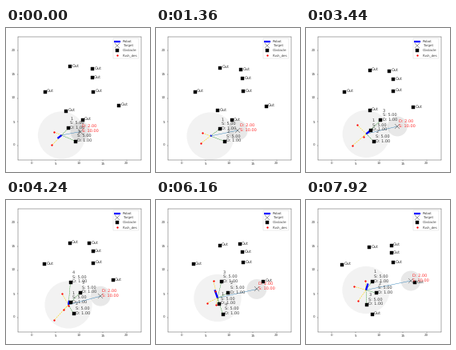
These frames come from a looping animation (180 by 180 pixels, 8 s). A matplotlib script:

```python
import matplotlib.pyplot as plt
import numpy as np
from matplotlib.animation import FuncAnimation
from matplotlib.patches import Circle

SIZE, DPI, FRAMES, STEP_MS = 180, 30, 100, 80
LEFT, RIGHT, TOP, BOTTOM = 14.5, 168.5, 10.5, 164.5
LOW, HIGH = -3, 23
UNIT = (RIGHT - LEFT) / (HIGH - LOW)
SENSE, GOAL_RADIUS = 5.0, 2.1
INK = "0.25"
LABEL_SHIFT = np.array([0.38, -0.08])

plt.rcParams.update({
    "font.family": "DejaVu Sans", "text.hinting": "none",
    "text.hinting_factor": 1, "text.color": INK,
    "xtick.labelcolor": INK, "ytick.labelcolor": INK,
    "axes.linewidth": 0.8,
})

# Start x, start y, drift x, drift y and sideways bow, in stage pixels
OBSTACLES = [
    (80.3, 48, -1, 11, 0),
    (108, 51.5, -1.5, 5, -3),
    (107.5, 62.3, -1, 4, 2),
    (48.5, 79.5, -3.5, 1, 1.5),
    (109, 79.5, 0, -1.5, 0),
    (141, 96.5, -5, 6.5, -4.5),
    (75, 103.5, 7.5, -1.5, 1.5),
    (95.5, 114.8, -7.5, 1.5, 1.2),
    (78, 125.3, -2, 5.6, 3.6),
    (87, 141.5, -4.5, 1.3, 0),
]


def glide(*keys):
    """Smooth curve through evenly spaced key values."""
    keys = np.array(keys, float)
    slopes = np.gradient(keys)
    pos = np.linspace(0, len(keys) - 1, FRAMES)
    i = np.minimum(pos.astype(int), len(keys) - 2)
    u = pos - i
    ease = u * u * (3 - 2 * u)
    return (keys[i] + ease * (keys[i + 1] - keys[i])
            + u * (1 - u) * ((1 - u) * slopes[i] - u * slopes[i + 1]))


def to_data(x, y):
    """Stage pixels to axes units."""
    return np.column_stack([LOW + (x - LEFT) / UNIT, LOW + (BOTTOM - y) / UNIT])


time = np.linspace(0, 1, FRAMES)
obstacle_paths = np.array([
    to_data(x + dx * time + bow * np.sin(np.pi * time), y + dy * time)
    for x, y, dx, dy, bow in OBSTACLES])
target_path = to_data(93 + 57.2 * time - 19.2 * time**2,
                      129.5 - 4.7 * time - 23.8 * time**2)
robot_path = to_data(glide(69.5, 68.3, 74.3, 79, 76.7, 75),
                     glide(134, 135, 132.8, 129.5, 121.5, 112.5))
angle = np.radians(glide(38, 25, 30, 100, 108, 73))
speed = glide(-6.4, 2.5, 7, 5, 11, 8.4) / UNIT
heading = np.column_stack([speed * np.cos(angle), speed * np.sin(angle)])

fig = plt.figure(figsize=(SIZE / DPI, SIZE / DPI), dpi=DPI, facecolor="white")
ax = fig.add_axes([LEFT / SIZE, 1 - BOTTOM / SIZE,
                   (RIGHT - LEFT) / SIZE, (BOTTOM - TOP) / SIZE])
ax.set(xlim=(LOW, HIGH), ylim=(LOW, HIGH),
       xticks=range(0, 21, 5), yticks=range(0, 21, 5))

sense_disc = Circle((0, 0), SENSE, fc="gray", ec="none", alpha=0.1)
goal_disc = Circle((0, 0), GOAL_RADIUS, fc="gray", ec="none", alpha=0.18)
for disc in (sense_disc, goal_disc):
    ax.add_patch(disc)


def line(**style):
    return ax.plot([], [], **style)[0]


count = len(OBSTACLES)
goal_line = line(color="tab:blue", lw=1, zorder=2)
sight_lines = [line(color="green", lw=1, ls="--", zorder=2) for _ in range(count)]
push_lines = [line(color="gold", lw=1.3, ls="--", zorder=2) for _ in range(count)]
body = line(color="blue", lw=5.5, solid_capstyle="butt", label="Robot", zorder=3)
target = line(color=INK, marker="x", ms=14, mew=0.9, ls="", label="Target", zorder=3)
blocks = line(color="black", marker="s", ms=9, ls="", label="Obstacle", zorder=3)
pushes = line(color="red", marker="o", ms=4.2, ls="", label="Push_des", zorder=3)
ax.legend(loc="upper right", fontsize=9, borderaxespad=0.75)

labels = [ax.text(0, 0, "", fontsize=11, zorder=4) for _ in range(count)]
goal_label = ax.text(0, 0, "D: 2.00\nS: 10.00", fontsize=11, color="#ff3030",
                     zorder=4)


def join(artist, a, b):
    artist.set_data([a[0], b[0]], [a[1], b[1]])


def draw(tick):
    robot, goal = robot_path[tick], target_path[tick]
    spots = obstacle_paths[:, tick]
    sense_disc.center, goal_disc.center = robot, goal
    join(body, robot, robot + heading[tick])
    join(goal_line, robot, goal)
    target.set_data([goal[0]], [goal[1]])
    goal_label.set_position(goal + LABEL_SHIFT)
    blocks.set_data(spots[:, 0], spots[:, 1])

    gaps = np.linalg.norm(spots - robot, axis=1)
    ranks = gaps.argsort().argsort() + 1
    tips = []
    for k, (spot, gap) in enumerate(zip(spots, gaps)):
        near = gap < SENSE
        sight_lines[k].set_visible(near)
        push_lines[k].set_visible(near)
        labels[k].set_position(spot + LABEL_SHIFT)
        labels[k].set_text(f"{ranks[k]}\nS: 5.00\nD: 1.00" if near else "Out")
        if near:
            # The closer the obstacle, the farther the push away from it
            tip = robot + (robot - spot) / gap * (SENSE - gap)
            tips.append(tip)
            join(sight_lines[k], robot, spot)
            join(push_lines[k], robot, tip)
    tips = np.array(tips).reshape(-1, 2)
    pushes.set_data(tips[:, 0], tips[:, 1])
    return []


anim = FuncAnimation(fig, draw, frames=FRAMES, interval=STEP_MS,
                     init_func=lambda: draw(0), repeat=True, repeat_delay=0)
plt.show()
```
